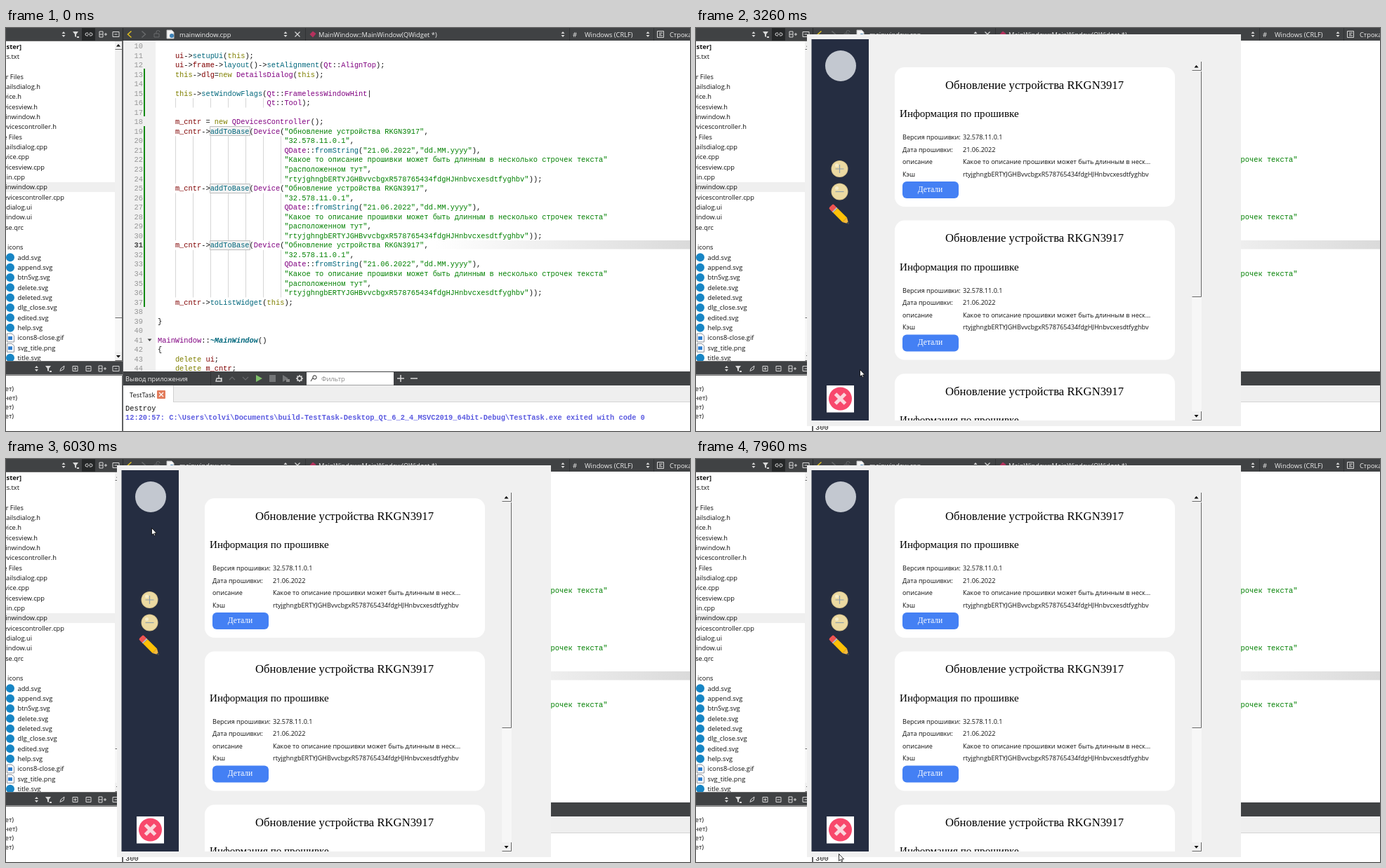
Write an HTML page with a canvas that moves like this. It is 974x575 px and loops after 8 s.

```html
<!DOCTYPE html>
<html lang="ru">
<head>
<meta charset="utf-8">
<style>
html, body { margin: 0; width: 100%; height: 100%; overflow: hidden; background: #fff; }
canvas { display: block; width: 974px; height: 575px; }
</style>
</head>
<body>
<canvas id="stage" width="974" height="575"></canvas>
<script>
const ctx = document.getElementById('stage').getContext('2d');
const LOOP = 8000, UI = '"Open Sans", sans-serif', MONO = '"Liberation Mono", monospace';
const SERIF = '"Liberation Serif", serif';
const CHAR = 6.22, ROW = 13.54, DARK = '#404244', LIGHT = '#d8d8d8', DIM = '#686a6c';
const DEVICE = 'Обновление устройства RKGN3917';
const HASH = 'rtyjghngbERTYJGHBvvcbgxR578765434fdgHJHnbvcxesdtfyghbv';

function rect(x, y, w, h, color) { ctx.fillStyle = color; ctx.fillRect(x, y, w, h); }

function text(s, x, y, { size = 9.3, color = '#111', font = UI, style = '', align = 'left' } = {}) {
  ctx.font = `${style} ${size}px ${font}`;
  ctx.fillStyle = color;
  ctx.textAlign = align;
  ctx.fillText(s, x, y);
}

const mono = (s, x, y, color, style, align) =>
  text(s, x, y, { size: 10.36, font: MONO, color, style, align });

function shape(path, { fill, stroke, width = 1, x = 0, y = 0 }) {
  ctx.save();
  ctx.translate(x, y);
  const p = new Path2D(path);
  if (fill) { ctx.fillStyle = fill; ctx.fill(p); }
  if (stroke) { ctx.strokeStyle = stroke; ctx.lineWidth = width; ctx.stroke(p); }
  ctx.restore();
}

function circle(x, y, r, color) {
  ctx.fillStyle = color;
  ctx.beginPath();
  ctx.arc(x, y, r, 0, 7);
  ctx.fill();
}

function rounded(x, y, w, h, r, color) {
  ctx.fillStyle = color;
  ctx.beginPath();
  ctx.roundRect(x, y, w, h, r);
  ctx.fill();
}

const line = (path, x, y, color = LIGHT, width = 1) => shape(path, { stroke: color, width, x, y });
const solid = (path, x, y, color = LIGHT) => shape(path, { fill: color, x, y });
const updown = (x, y) => solid('M-2.5-1L0-4L2.5-1ZM-2.5 1L0 4L2.5 1Z', x, y);
const funnel = (x, y) => solid('M-4-4H4L1 0V4L-1 3V0ZM2 3H5V5H2Z', x, y);
const split = (x, y) => line('M-5-4H0V4H-5ZM-5 0H0M2 0H6M4-2V2', x, y);
const panel = (x, y) => line('M-4.5-3.5H4.5V3.5H-4.5ZM-2 0H2', x, y);
const chain = (x, y) => line('M-1-2H-3A2 2 0 0 0-3 2H-1M1-2H3A2 2 0 0 1 3 2H1M-2 0H2', x, y);

// Classic raised scrollbar: arrow buttons at both ends, thumb right below the upper one
function scrollbar(x, top, w, bottom, thumbEnd) {
  rect(x, top, w, bottom - top, '#f7f7f7');
  for (const [y0, y1] of [[top, top + 13], [top + 14, thumbEnd], [bottom - 13, bottom]]) {
    rect(x, y0, w, y1 - y0, '#f0f0f0');
    line(`M${x + .5} ${y1 - .5}H${x + w - .5}V${y0}`, 0, 0, '#696969');
  }
  solid('M-3 1.5L0-2L3 1.5Z', x + w / 2 - .5, top + 7, '#000');
  solid('M-3-1.5L0 2L3-1.5Z', x + w / 2 - .5, bottom - 6.5, '#000');
}

// Project tree

const TREE = [
  [3, 'Header Files', 25], [4, 'detailsdialog.h', 49], [5, 'device.h', 22], [6, 'devicesview.h', 45],
  [7, 'mainwindow.h', 49], [8, 'devicescontroller.h', 72], [9, 'Source Files', 23],
  [10, 'detailsdialog.cpp', 59], [11, 'device.cpp', 33], [12, 'devicesview.cpp', 55],
  [13, 'main.cpp', 27], [14, 'mainwindow.cpp', 59], [15, 'devicescontroller.cpp', 83],
  [16, 'detailsdialog.ui', 37], [17, 'mainwindow.ui', 37], [18, 'base.qrc', 25], [1, 'CMakeLists.txt', 19]
];
const ICONS = ['add.svg', 'append.svg', 'btnSvg.svg', 'delete.svg', 'deleted.svg', 'dlg_close.svg',
  'edited.svg', 'help.svg', 'icons8-close.gif', 'svg_title.png', 'title.svg'];

function drawTree(t) {
  const rowY = i => 26.4 + 14.33 * i;
  rect(0, 18, 167, 557, '#fff');
  rect(0, 220, 155, 14, '#efefef');
  text('[master]', 22, rowY(0) + 3.2, { style: 'bold', align: 'right' });
  for (const [i, name, right] of TREE) text(name, right, rowY(i) + 3.2, { align: 'right' });
  text('icons', 2, rowY(20) + 3.2);
  ICONS.forEach((name, i) => {
    const y = rowY(21 + i);
    if (/svg$/.test(name)) circle(6, y, 6, '#1785c4');
    else {
      shape('M1.5-6H8L11.5-3V6H1.5Z', { fill: '#fff', stroke: '#8a9099', y });
      rect(3, y - 2, 6, 5, '#2f7fd0');
    }
    text(name, 16.5, y + 3.2);
  });

  scrollbar(155, 18, 11, 475, 414);
  line('M0 18.5H165.5V475.5H0', 0, 0, '#696969');

  rect(0, 476, 167, 18.5, DARK);
  if (t >= 650 && t < 1130) rect(0, 478, 49, 16, '#5b5d5f');
  updown(43.5, 486);
  funnel(60, 486);
  line('M-3 4L-2 0L3-4L2 1L-2 3', 80, 486);
  line('M-3.5-3.5H3.5V3.5H-3.5ZM-2 0H2M0-2V2', 98.5, 486);
  line('M-3.5-3.5H3.5V3.5H-3.5ZM-2 0H2', 117.5, 486);
  split(137, 486);
  panel(156.5, 486);
  ['ет)', 'нет)', 'ет)', 'ет)'].forEach((s, i) =>
    text(s, i === 1 ? 16 : 11, 518 + i * 13, { align: 'right' }));
  line('M0 495.5H165.5V575', 0, 0, '#696969');
  rect(166, 0, 1, 575, '#55575a');
}

// Editor

const INK = { olive: '#808000', type: '#800080', call: '#00677c', field: '#800000', string: '#008000' };
const WORDS = {};
const define = (kind, words) => words.split(' ').forEach(w => WORDS[w] = INK[kind]);
define('olive', 'this new delete');
define('type', 'Qt AlignTop DetailsDialog FramelessWindowHint Tool QDevicesController Device QDate MainWindow');
define('call', 'setupUi layout setAlignment setWindowFlags addToBase fromString toListWidget');
define('field', 'ui frame dlg m_cntr');

const CODE = {
  11: [4, 'ui->setupUi(this);'],
  12: [4, 'ui->frame->layout()->setAlignment(Qt::AlignTop);'],
  13: [4, 'this->dlg=new DetailsDialog(this);'],
  15: [4, 'this->setWindowFlags(Qt::FramelessWindowHint|'],
  16: [25, 'Qt::Tool);'],
  18: [4, 'm_cntr = new QDevicesController();'],
  37: [4, 'm_cntr->toListWidget(this);'],
  39: [0, '}'], 41: [0, 'MainWindow::'], 42: [0, '{'],
  43: [4, 'delete ui;'], 44: [4, 'delete m_cntr;']
};
const BLOCKS = [19, 25, 31];
for (const first of BLOCKS) {
  CODE[first] = [4, `m_cntr->addToBase(Device("${DEVICE}",`];
  ['"32.578.11.0.1",', 'QDate::fromString("21.06.2022","dd.MM.yyyy"),',
    '"Какое то описание прошивки может быть длинным в несколько строчек текста"',
    '"расположенном тут",', `"${HASH}"));`
  ].forEach((s, i) => CODE[first + 1 + i] = [29, s]);
}

const colX = col => 216 + col * CHAR;
const lineY = n => 25.5 + (n - 10) * ROW;

function guides(first, rows, count) {
  for (let i = 1; i <= count; i++)
    rect(Math.round(colX(i * 4) + .5), lineY(first) - 6.7, 1, rows * ROW, '#d6d6d6');
}

function drawEditor(t) {
  rect(167, 18, 807, 472, '#fff');
  rect(167, 18, 46, 472, '#f0f0f0');
  const band = ctx.createLinearGradient(610, 0, 974, 0);
  band.addColorStop(0, '#fff');
  band.addColorStop(1, '#dadada');
  rect(610, 303, 364, 12.5, band);
  rect(196, 58, 2, 68, '#148a14');
  rect(196, 140, 2, 258, '#148a14');

  guides(16, 1, 6);
  for (const first of BLOCKS) {
    guides(first + 1, 5, 7);
    shape('M0 0H57V13H0Z', { fill: '#f3f3f3', stroke: '#bdbdbd', x: 290.5, y: Math.round(lineY(first)) - 6.5 });
  }
  for (let n = 10; n <= 44; n++) {
    const y = lineY(n) + 3.5, current = n === 31;
    mono(n, 195, y, current ? '#444' : '#969696', current ? 'bold' : '', 'right');
    if (!CODE[n]) continue;
    let [col, source] = CODE[n];
    for (const token of source.match(/"[^"]*"|\w+|[^\w"]+/g)) {
      mono(token, colX(col), y, token[0] === '"' ? INK.string : WORDS[token] || '#111');
      col += token.length;
    }
  }
  mono('~MainWindow', colX(12), lineY(41) + 3.5, INK.call, 'italic bold');
  mono('()', colX(23), lineY(41) + 3.5, '#111');
  solid('M-3-1.5H3L0 2Z', 204.5, 445, '#444');
  if (t >= 1930 && t < 2190) rect(297, 303, 1, 13, '#000');
}

function drawTopBar() {
  const white = { color: '#eee' };
  rect(0, 0, 974, 18, DARK);
  rect(108, 0, 19, 18, '#252728');
  updown(82, 9);
  funnel(99, 9);
  chain(118, 9);
  split(138, 9);
  panel(156.5, 9);
  rect(166, 0, 1, 18, '#28292a');
  line('M2.5-4.5L-2.5 0L2.5 4.5', 176, 9, '#e0c020', 1.5);
  line('M-2.5-4.5L2.5 0L-2.5 4.5', 196, 9, DIM, 1.5);
  shape('M-4-1H3V4H-4ZM-1-1V-3A2 2 0 0 1 4-3', { stroke: DIM, x: 215, y: 9 });
  shape('M-5-6H2L5-3V6H-5Z', { fill: '#f4f4f4', stroke: '#bbb', x: 234, y: 9 });
  circle(236, 11, 3, '#3e82b8');
  text('mainwindow.cpp', 247, 12.5, white);
  updown(398, 9);
  line('M-3.5-3.5L3.5 3.5M-3.5 3.5L3.5-3.5', 415, 9, LIGHT, 1.2);
  for (const x of [426, 802, 922]) rect(x, 0, 1, 18, '#303234');
  solid('M-4.5 0L0-4.5L4.5-1L0 4.5Z', 437, 9, '#b5315d');
  text('MainWindow::MainWindow(QWidget *)', 445, 12.5, white);
  updown(793, 9);
  text('#', 807, 12.5, white);
  text('Windows (CRLF)', 824, 12.5, white);
  updown(914, 9);
  line('M-4.5-4.5H4.5V4.5H-4.5ZM-2-2H3M-2 0H1M-2 2H3', 932, 9);
  text('Строка', 945, 12.5, white);
}

// Output pane

function drawOutput(t) {
  const running = t >= 2190;
  rect(167, 490, 807, 20, DARK);
  text('Вывод приложения', 170, 504, { color: '#eee' });
  rect(291, 490, 1, 20, '#303234');
  line('M0-5V0M-4 4L-3 0H3L4 4ZM4-1V4', 303, 500, LIGHT, 1.3);
  line('M-4 2L0-2L4 2', 322, 500, DIM, 1.2);
  line('M-4-2L0 2L4-2', 341, 500, DIM, 1.2);
  solid('M-4-5L5 0L-4 5Z', 360, 500, running ? '#747678' : '#7fbf6a');
  rect(375, 495, 9, 10, running ? '#e0706c' : '#747678');
  solid('M-4-5L4 0L-4 5Z', 398, 500, running ? '#7fbf6a' : '#747678');
  rect(399, 501, 5, 4, running ? '#ddd' : '#8a8a8a');
  shape('M-3 0A3 3 0 1 0 3 0A3 3 0 1 0-3 0M0-5V-3M0 3V5M-5 0H-3M3 0H5M-3.5-3.5L-2-2M2 2L3.5 3.5M-3.5 3.5L-2 2M2-2L3.5-3.5',
    { stroke: LIGHT, width: 1.6, x: 418, y: 500 });
  rect(428, 491, 124, 18.5, '#fff');
  line('M-1-1A2.6 2.6 0 1 1 1 1A2.6 2.6 0 0 1-1-1L-4 4', 438, 500, '#555', 1.2);
  text('Фильтр', 449, 504, { color: '#888' });
  line('M-5 0H5M0-5V5', 562, 500, LIGHT, 1.5);
  line('M-5 0H5', 581, 500, LIGHT, 1.5);

  rect(167, 510, 807, 24, '#efefef');
  rect(167, 533, 807, 1, '#d4d4d4');
  rect(167, 510, 71, 24, '#fff');
  rect(238, 510, 1, 24, '#d0d0d0');
  text('TestTask', 176, 526.5);
  rounded(215, 517, 12, 12, 1, '#e27c5c');
  line('M-3-3L3 3M-3 3L3-3', 221, 523, '#fff', 1.2);

  rect(167, 534, 807, 41, '#fff');
  if (!running) {
    mono('Destroy', 170, 546, '#111');
    mono('12:20:57: C:\\Users\\tolvi\\Documents\\build-TestTask-Desktop_Qt_6_2_4_MSVC2019_64bit-Debug\\TestTask.exe exited with code 0',
      170, 559, '#5b5be0', 'bold');
  } else if (t >= 2390) {
    for (let i = 0; i < 3; i++) mono('300', 170, 546.5 + i * 13.2, '#111');
  }
}

// Device window

const FIELDS = [['Версия прошивки:', '32.578.11.0.1'], ['Дата прошивки:', '21.06.2022'],
  ['описание', 'Какое то описание прошивки может быть длинным в неск...'], ['Кэш', HASH]];

function drawCard(y, hovered) {
  rounded(283, y, 399, 199, 14, '#fff');
  text(DEVICE, 482, y + 30.5, { size: 16.7, font: SERIF, align: 'center', color: '#000' });
  text('Информация по прошивке', 290, y + 71, { size: 15.1, font: SERIF, color: '#000' });
  FIELDS.forEach(([label, value], i) => {
    const base = y + 103 + i * 17.5;
    text(label, 294, base, { size: 9.1 });
    text(value, 380, base, { size: 9.1 });
  });
  rounded(294, y + 163, 80, 24, 6, hovered ? '#2f68d8' : '#4480f4');
  text('Детали', 333.5, y + 177.5, { size: 11.5, font: SERIF, align: 'center', color: '#fff' });
}

function coin(y, sign) {
  circle(204.5, y, 12, '#d9c48c');
  circle(204.5, y, 11, '#ecdaa2');
  circle(200.5, y - 5, 2.5, '#f6edcc');
  line(sign, 204.5, y, '#8f9fac', 1.2);
}

function drawWindow(cursor) {
  const over = (top, bottom) => cursor && cursor.x >= 172 && cursor.x < 240 && cursor.y >= top && cursor.y < bottom;
  rect(158, 9, 618, 559, '#f0f0f0');
  rect(164.5, 16, 81.5, 544, '#252d41');
  for (const [top, bottom] of [[23, 83], [187, 215], [219, 247.5], [252, 280], [510, 548]])
    if (over(top, bottom)) rect(172, top, 67.5, bottom - top, '#bcb8c8');

  circle(206, 54, 22, '#c3c8d0');
  coin(201, 'M-6 0H6M0-6V6');
  coin(233.5, 'M-6 0H6');
  ctx.save();
  ctx.translate(192, 254);
  ctx.rotate(Math.PI / 4);
  rounded(0, -4.5, 9, 9, 2, '#ef5350');
  rect(7, -4.5, 2, 9, '#b0bec5');
  rect(9, -4.5, 19, 9, '#ffc107');
  solid('M28-4.5L36 0L28 4.5Z', 0, 0, '#f5b83c');
  solid('M33-1.7L36 0L33 1.7Z', 0, 0, '#37474f');
  ctx.restore();
  rect(186, 510, 39, 38.5, '#fff');
  circle(205.5, 529, 16.5, '#f8486c');
  line('M-7-7L7 7M-7 7L7-7', 205.5, 529, '#fbd5dc', 5);

  ctx.save();
  ctx.beginPath();
  ctx.rect(252, 16, 524, 544);
  ctx.clip();
  for (let i = 0; i < 3; i++) {
    const y = 56 + i * 218.6, b = y + 163;
    drawCard(y, cursor && cursor.x > 294 && cursor.x < 374 && cursor.y > b && cursor.y < b + 24);
  }
  ctx.restore();
  scrollbar(706, 48, 14, 560, 384);
}

// Pointer: each move is [start, end, steps, x, y]

const MOVES = [
  [110, 110, 1, 662, 534], [180, 250, 2, 347, 513], [520, 650, 3, 35, 487], [920, 920, 1, 27, 487],
  [3260, 3260, 1, 233, 487], [3330, 3540, 4, 329, 448], [3740, 3870, 3, 329, 374],
  [4200, 4340, 3, 198, 242], [4670, 4950, 5, 206, 179], [5280, 5480, 4, 209, 84],
  [5550, 5680, 3, 206, 44], [5750, 6030, 5, 207, 98], [6110, 6310, 4, 204, 212],
  [6640, 6640, 1, 200, 231], [6710, 7060, 6, 203, 363], [7320, 7960, 10, 203, 563]
];

function pointer(t) {
  if (t < 110 || (t >= 990 && t < 3260)) return null;
  let x = 0, y = 0;
  for (const [start, end, steps, toX, toY] of MOVES) {
    if (t < start) break;
    const pace = (end - start) / Math.max(steps - 1, 1) || 1;
    const done = t >= end ? 1 : (Math.floor((t - start) / pace) + 1) / steps;
    x += (toX - x) * done;
    y += (toY - y) * done;
  }
  return { x, y };
}

function draw(t) {
  const cursor = pointer(t);
  drawTree(t);
  drawEditor(t);
  drawTopBar();
  drawOutput(t);
  if (t >= 2850) {
    const shown = Math.min(1, (Math.floor((t - 2850) / 70) + 1) / 3);
    const scale = .9 + .1 * shown;
    ctx.save();
    ctx.globalAlpha = shown;
    ctx.translate(467 * (1 - scale), 288.5 * (1 - scale));
    ctx.scale(scale, scale);
    drawWindow(cursor);
    ctx.restore();
  }
  if (cursor) shape('M.5.5V10.5L2.8 8.4L4.3 11.6L5.8 10.9L4.4 7.9H7.5Z',
    { fill: '#fff', stroke: '#000', width: .8, ...cursor });
}

function frame(now) {
  draw(now % LOOP);
  requestAnimationFrame(frame);
}
requestAnimationFrame(frame);
</script>
</body>
</html>
```
